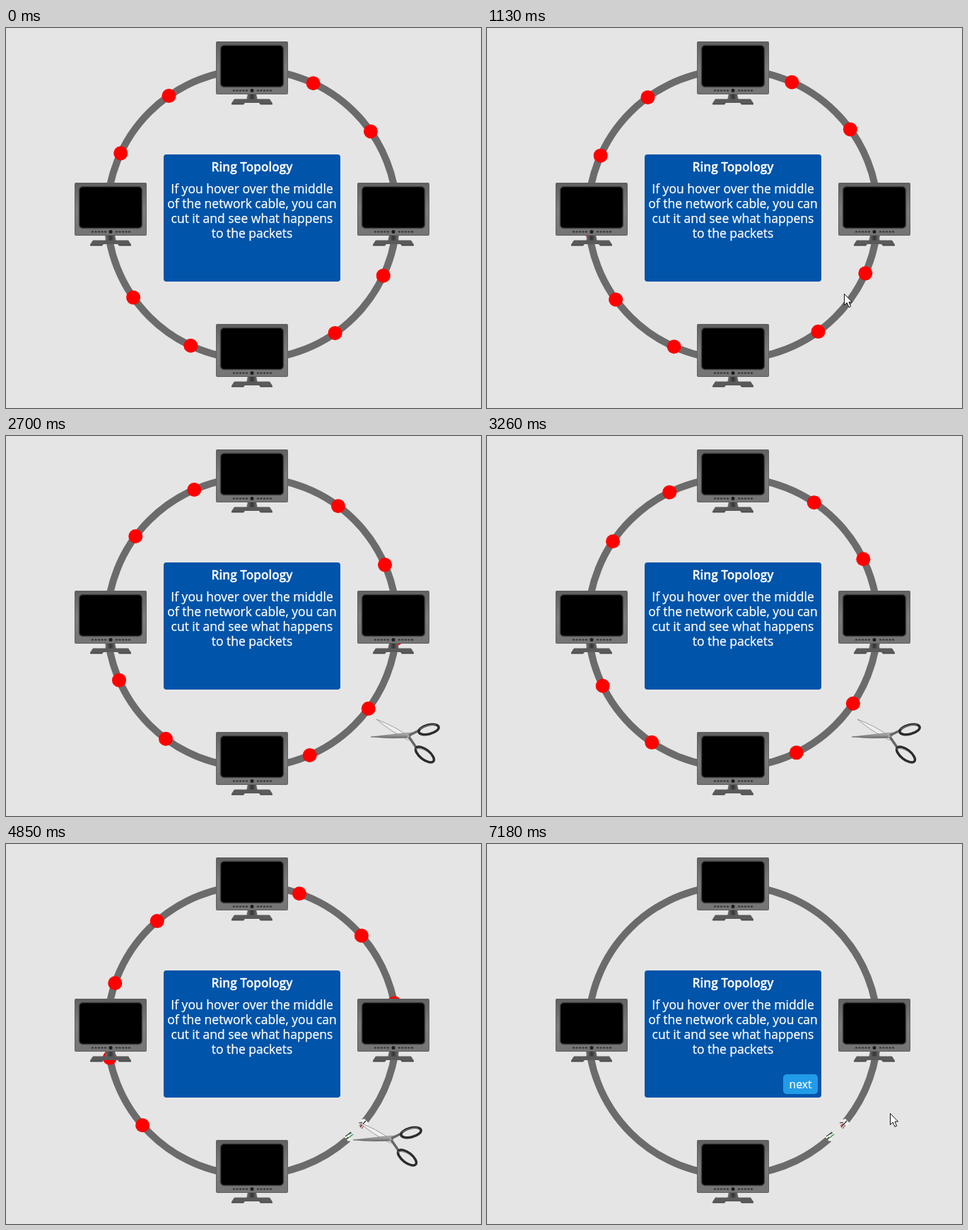
Recreate the animation shown at these times as an HTML page. Size 672x538 px, loop 7.23 s.

```html
<!DOCTYPE html>
<html lang="en">
<head>
<meta charset="utf-8">
<title>Ring Topology</title>
<style>
  html, body { margin: 0; width: 100%; height: 100%; overflow: hidden; background: #e5e5e5; }
  svg { display: block; width: 672px; height: 538px; }
  text { font-family: "Open Sans", "Noto Sans", sans-serif; fill: #fff; text-anchor: middle; }
  .title { font-size: 17.2px; font-weight: 600; stroke: #fff; stroke-width: .3px; }
  .body { font-size: 17.5px; stroke: #fff; stroke-width: .25px; }
  .label { font-size: 15.7px; stroke: #fff; stroke-width: .2px; }
</style>
</head>
<body>
<svg viewBox="0 0 672 538">
  <defs>
    <linearGradient id="case" x2="0" y2="1">
      <stop offset="0" stop-color="#606060"/>
      <stop offset=".5" stop-color="#7c7c7c"/>
      <stop offset="1" stop-color="#747474"/>
    </linearGradient>
    <linearGradient id="neck">
      <stop offset="0" stop-color="#777"/>
      <stop offset=".5" stop-color="#333"/>
      <stop offset="1" stop-color="#777"/>
    </linearGradient>
    <linearGradient id="steel" x2="0" y2="1">
      <stop offset="0" stop-color="#c4c4c4"/>
      <stop offset="1" stop-color="#666"/>
    </linearGradient>
    <g id="monitor">
      <path d="M45 74h12l2 9h-16z" fill="url(#neck)"/>
      <path d="M26 81.500h50l4 6v2h-17l-2-2.500h-20l-2 2.500h-17v-2z" fill="#5a5a5a"/>
      <path d="M23 88.500h16M63 88.500h16" stroke="#444"/>
      <rect x=".5" y=".5" width="101" height="74" rx="1" fill="url(#case)" stroke="#606060"/>
      <rect x="6.500" y="5.500" width="89" height="59" rx="5" stroke="#444" stroke-width="1.500"/>
      <path d="M24 69.500h21M58 69.500h21" stroke="#333" stroke-width="2" stroke-dasharray="3 1.500"/>
      <circle cx="51" cy="69.500" r="2.500" fill="#1c1c1c"/>
    </g>
  </defs>

  <circle id="ring" cx="348" cy="264" r="205" fill="none" stroke="#6b6b6b" stroke-width="10" pathLength="360"/>
  <g id="wires" fill="none" stroke-width="1.200">
    <path d="M478 414l6 7 4-3-5-8z M501 391l9 9 3-5-6-6z" fill="#f4f4f4"/>
    <path d="M480 414l8-6M481 418l3-3" stroke="#333"/>
    <path d="M482 418l9-7M485 411l4-2" stroke="#3b8b48"/>
    <path d="M501 401l8-9M499 395l5-1" stroke="#2b2b2b"/>
    <path d="M503 403l4-5M500 399l4-3" stroke="#b83a3a"/>
  </g>
  <g id="dots" fill="#f00"></g>
  <use href="#monitor" x="297" y="19"/>
  <use href="#monitor" x="97" y="219"/>
  <use href="#monitor" x="497" y="219"/>
  <use href="#monitor" x="297" y="419"/>

  <rect x="223" y="179" width="250" height="180" rx="4" fill="#0054a9"/>
  <text class="title" x="348" y="203">Ring Topology</text>
  <g class="body">
    <text x="348" y="234">If you hover over the middle</text>
    <text x="348" y="255">of the network cable, you can</text>
    <text x="348" y="276">cut it and see what happens</text>
    <text x="348" y="297">to the packets</text>
  </g>
  <g id="next">
    <rect x="419" y="326" width="49" height="28" rx="5" fill="#229be8"/>
    <text class="label" x="443.500" y="346">next</text>
  </g>

  <path id="arrow" d="M.5 .5V16.500L4.300 13L7 19.300L9.600 18.200L7 12H11.500Z" fill="#fff" stroke="#111" stroke-linejoin="round"/>
  <g id="scissors">
    <path d="M8 1Q34 11 50 23L57 30L52 30Q28 18 8 1Z" fill="#eee" stroke="#8a8a8a" stroke-width=".8"/>
    <path d="M0 26L46 21L60 20L55 27Q28 29 0 26Z" fill="url(#steel)" stroke="#666" stroke-width=".6"/>
    <g fill="none" stroke="#2c2c2c" stroke-width="3.500">
      <path d="M54 24L68 17M54 26L65 42" stroke="#666"/>
      <ellipse cx="82" cy="15.500" rx="14.500" ry="6.500" transform="rotate(-14 82 15.500)"/>
      <ellipse cx="76.500" cy="51" rx="15.500" ry="7" transform="rotate(38 76.500 51)"/>
    </g>
    <path d="M69 15Q80 8 92 9M63 43Q71 41 80 47" fill="none" stroke="#888"/>
    <circle cx="53" cy="25" r="1.700" fill="#aaa"/>
  </g>
</svg>
<script>
const LOOP = 7230, CUT = 4600, NEXT = 6980;
const CX = 348, CY = 264, R = 205, COUNT = 12;
const TURN_MS = 5760, TURN_DEG = 600;
const $ = id => document.getElementById(id);

// Pointer stops: arrival ms, travel ms, x, y
const STOPS = [
  [90, 0, 616, 538], [800, 700, 528, 414], [1100, 250, 505, 376],
  [1500, 250, 516, 400], [3840, 80, 511, 383], [4800, 200, 491, 393],
  [5680, 180, 493, 373], [5980, 160, 555, 391], [6200, 200, 570, 381]
];

const show = (el, on) => el.setAttribute("visibility", on ? "visible" : "hidden");

// Packets run clockwise at a nearly even pace
const turnAt = t => 24.9 + TURN_DEG * t / TURN_MS + 1.35 * Math.sin(2 * Math.PI * t / TURN_MS);

function pointerAt(t) {
  let [, , x, y] = STOPS[0];
  for (const [end, span, nx, ny] of STOPS.slice(1)) {
    const p = Math.min(1, Math.max(0, 1 - (end - t) / span));
    const ease = p * p * (3 - 2 * p);
    x += (nx - x) * ease;
    y += (ny - y) * ease;
  }
  return [Math.round(x), Math.round(y)];
}

const overCable = (x, y) => x < 560 && y > 382 && y < 430;

const dots = Array.from({ length: COUNT }, () => {
  const dot = document.createElementNS("http://www.w3.org/2000/svg", "circle");
  dot.setAttribute("r", 10);
  $("dots").append(dot);
  return dot;
});

function draw(t) {
  const cut = t >= CUT;
  const turn = turnAt(t), cleared = turn - turnAt(CUT);

  dots.forEach((dot, i) => {
    const deg = turn + i * 360 / COUNT, rad = deg * Math.PI / 180;
    dot.setAttribute("cx", CX + R * Math.cos(rad));
    dot.setAttribute("cy", CY + R * Math.sin(rad));
    // Once cut, packets only survive between the bottom and right computers
    const past = (deg + 270) % 360;
    show(dot, !cut || (past >= cleared && past < 270));
  });

  $("ring").setAttribute("stroke-dasharray", cut ? "39 9.6 400" : "none");
  show($("wires"), cut);
  show($("next"), t >= NEXT);

  const [x, y] = pointerAt(t), over = overCable(x, y);
  for (const id of ["arrow", "scissors"]) {
    $(id).setAttribute("transform", `translate(${x} ${y})`);
    show($(id), t >= STOPS[0][0] && over === (id === "scissors"));
  }
}

const start = performance.now();
function tick(now) {
  draw(Math.max(0, now - start) % LOOP);
  requestAnimationFrame(tick);
}
draw(0);
requestAnimationFrame(tick);
</script>
</body>
</html>
```
